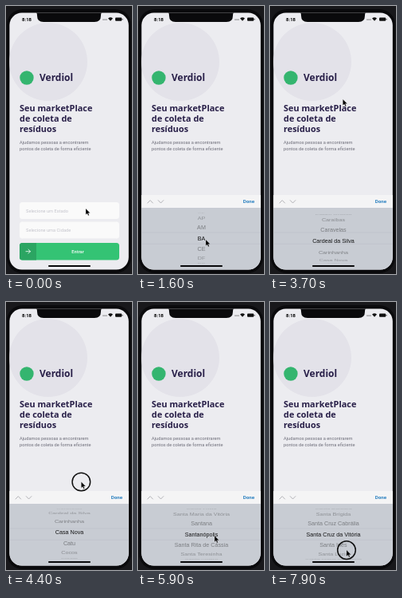
Write an HTML page that moves like this. It is 158 by 336 pixels and loops after 8000 ms.

```html
<!DOCTYPE html>
<html lang="pt-BR">
<head>
<meta charset="utf-8">
<title>Verdiol</title>
<style>
html, body { margin: 0; width: 100%; height: 100%; overflow: hidden; background: #18181b; }
svg { display: block; width: 100%; height: 100%; }
text { font-family: Roboto, "Liberation Sans", sans-serif; font-size: 5.7px; }
.title { font: 700 10.9px "Noto Sans", "Open Sans", sans-serif; fill: #281f48; }
.brand { font: 600 12px "Noto Sans", "Open Sans", sans-serif; fill: #281f48; }
.hint { fill: #c4c4cc; }
.row { font: 7.2px "Liberation Sans", Arial, sans-serif; text-anchor: middle; }
.line { fill: none; stroke-linecap: round; stroke-linejoin: round; }
</style>
</head>
<body>
<svg viewBox="0 0 158 336">
  <defs>
    <clipPath id="screen"><rect x="4.4" y="8.6" width="149.4" height="322" rx="15.5"/></clipPath>
    <clipPath id="wheel"><rect x="4" y="253" width="150" height="78"/></clipPath>
  </defs>
  <rect width="158" height="336" fill="#18181b"/>
  <rect x="1" y="4" width="156" height="331" rx="20" fill="#0a0a0c"/>
  <g clip-path="url(#screen)">
    <rect x="4" y="8" width="150" height="323" fill="#ececf0"/>
    <circle cx="53" cy="70" r="49" fill="#e3e2e9"/>
    <path d="M37 8H121Q119 8 119 12Q119 20 111 20H47Q39 20 39 12Q39 8 37 8" fill="#0a0a0c"/>
    <text x="20" y="18.6" style="font-weight:700;font-size:6px">8:18</text>
    <g fill="#111">
      <circle cx="122" cy="17" r=".6"/><circle cx="124" cy="17" r=".6"/><circle cx="126" cy="17" r=".6"/>
      <path d="M128 15.6Q131 13 134 15.6L131 18.8Z"/>
      <rect x="137" y="14.6" width="8.2" height="4.2" rx="1.1"/><rect x="145.6" y="15.9" width=".8" height="1.6"/>
    </g>

    <circle cx="26" cy="90" r="8.7" fill="#34b56f"/>
    <text class="brand" x="42" y="94.2">Verdiol</text>
    <text class="title" x="17" y="131.5">Seu marketPlace</text>
    <text class="title" x="17" y="144.8">de coleta de</text>
    <text class="title" x="17" y="158">resíduos</text>
    <g fill="#6c6c78">
      <text x="17" y="172.8">Ajudamos pessoas a encontrarem</text>
      <text x="17" y="181.2">pontos de coleta de forma eficiente</text>
    </g>

    <rect x="17" y="246" width="125" height="21" rx="3.5" fill="#fafafa"/>
    <rect x="17" y="270.5" width="125" height="21" rx="3.5" fill="#fafafa"/>
    <text id="state" class="hint" x="25" y="258.6">Selecione um Estado</text>
    <text class="hint" x="25" y="283">Selecione uma Cidade</text>
    <rect x="17" y="297" width="125" height="21.5" rx="3.5" fill="#34c374"/>
    <path d="M38 297H20.5Q17 297 17 300.5V315Q17 318.5 20.5 318.5H38Z" fill="#2ba562"/>
    <path class="line" d="M25 307.7H30.5M28 305.2L30.5 307.7L28 310.2" stroke="#fff" stroke-width=".8"/>
    <text x="90" y="309.8" text-anchor="middle" fill="#fff" font-weight="500">Entrar</text>

    <g id="picker">
      <rect x="4" y="237" width="150" height="16" fill="#f4f4f5"/>
      <rect x="4" y="253" width="150" height="78" fill="#c8ccd3"/>
      <path class="line" d="M12 247L15.3 243.6L18.6 247M25.3 243.6L28.6 247L31.9 243.6" stroke="#a2a3a8" stroke-width=".8"/>
      <text x="146" y="247.3" text-anchor="end" fill="#2a80c0" style="font-size:6.2px;font-weight:600">Done</text>
      <g id="rows" clip-path="url(#wheel)"></g>
      <path d="M4 284H154M4 298.3H154" stroke="#b2b7bf" stroke-width=".4"/>
    </g>
    <rect x="53" y="325" width="53" height="1.9" rx=".95" fill="#08080a"/>
  </g>
  <g id="cursor">
    <circle id="ring" r="11.3" fill="none" stroke="#111" stroke-width="1.5"/>
    <path d="M0 0V9.5L2.3 7.5L3.8 11L5.3 10.3L3.8 7H6.8Z" transform="scale(.8)" stroke="#ddd" stroke-width=".3"/>
  </g>
</svg>
<script>
const LOOP = 8000;
const $ = id => document.getElementById(id);
const states = "Selecione um Estado,AC,AL,AP,AM,BA,CE,DF,ES,GO".split(",");
const cities = ("Selecione uma Cidade,Abaíra,Abaré,Acajutiba,Adustina,Água Fria,Aiquara,Alagoinhas,Alcobaça," +
  "Amargosa,Anagé,Andaraí,Aporá,Aracatu,Baianópolis,Barra,Barreiras,Belmonte,Boquira,Brumado,Buerarema," +
  "Cachoeira,Caetité,Cairu,Camaçari,Canavieiras,Capim Grosso,Caraíbas,Caravelas,Cardeal da Silva,Carinhanha," +
  "Casa Nova,Catu,Cocos,Conde,Coribe,Correntina,Curaçá,Entre Rios,Esplanada,Feira de Santana,Gandu,Guanambi," +
  "Ibotirama,Ilhéus,Ipirá,Irecê,Itabuna,Jacobina,Jequié,Juazeiro,Lençóis,Macaúbas,Maragogipe,Mucugê," +
  "Nazaré,Nova Viçosa,Paramirim,Paulo Afonso,Poções,Porto Seguro,Prado,Presidente Tancredo Neves,Queimadas," +
  "Quijingue,Quixabeira,Rafael Jambeiro,Remanso,Riachão do Jacuípe,Rio Real,Ruy Barbosa,Salvador," +
  "Santa Bárbara,Santa Brígida,Santa Cruz Cabrália,Santa Cruz da Vitória,Santa Inês,Santa Luzia," +
  "Santa Maria da Vitória,Santana,Santanópolis,Santa Rita de Cássia,Santa Teresinha,Santo Amaro").split(",");
const at = name => cities.indexOf(name);

const mix = (a, b, p) => a + (b - a) * p;
function ease(start, end, t) {
  const p = Math.min(1, Math.max(0, (t - start) / (end - start)));
  return p * p * (3 - 2 * p);
}
// Each move is [start, end, target].
const follow = (from, moves, t) => moves.reduce((v, [start, end, to]) => mix(v, to, ease(start, end, t)), from);

const sheetY = t => follow(94, [[300, 700, 0], [2050, 2250, 94], [2400, 2680, 0]], t);
const stateAt = t => follow(0, [[900, 1500, 5]], t);
const cityAt = t => follow(0, [
  [2650, 2820, at("Acajutiba")],
  [3400, 3720, at("Cardeal da Silva")],
  [4300, 4960, at("Quijingue")],
  [5200, 5840, at("Santanópolis")],
  [6300, 7250, at("Santa Cruz da Vitória")]
], t);

const taps = [230, 900, 1950, 2300];
const tapX = t => follow(100, [[0, 220, 92], [450, 1100, 85], [1650, 1900, 138], [2060, 2280, 88], [2450, 2750, 95]], t);
const tapY = t => follow(254, [[0, 220, 256], [450, 1100, 293], [1650, 1900, 244], [2060, 2280, 281], [2450, 2750, 285]], t);

// After the taps the pointer swipes up and returns; two swipes drag downwards instead.
const SWIPES = 3245, PERIOD = 900;

function pointer(t) {
  if (t < SWIPES) return { x: tapX(t), y: tapY(t), down: taps.some(tap => t >= tap && t < tap + 100) };
  const swipe = Math.floor((t - SWIPES) / PERIOD), u = (t - SWIPES) / PERIOD - swipe;
  const lift = ease(.2, .42, u) - ease(.42, .95, u);
  const backwards = swipe === 3 || swipe === 4;
  return {
    x: mix(96, 91, lift),
    y: mix(Math.max(285, 240 + .009 * t), 104, lift),
    down: backwards ? u > .42 && u < .9 : u > .12 && u < .42
  };
}

const rows = Array.from({ length: 7 }, () => {
  const row = document.createElementNS("http://www.w3.org/2000/svg", "text");
  row.setAttribute("class", "row");
  row.setAttribute("y", 2.5);
  return $("rows").appendChild(row);
});

// Rows sit on a cylinder seen from the front.
function drawWheel(list, pos) {
  const base = Math.round(pos);
  rows.forEach((row, i) => {
    const index = base + i - 3, d = index - pos, angle = d * .451;
    const depth = Math.max(0, Math.cos(angle));
    row.textContent = list[index] || "";
    row.setAttribute("transform", `translate(79.5 ${291.2 + 32 * Math.sin(angle)}) scale(1 ${depth})`);
    row.setAttribute("opacity", Math.abs(d) < .5 ? .9 : .08 + .34 * depth);
  });
}

function draw(t) {
  $("picker").setAttribute("transform", `translate(0 ${sheetY(t)})`);
  if (t < 2300) drawWheel(states, stateAt(t));
  else drawWheel(cities, cityAt(t));

  const chosen = t > 1200;
  $("state").textContent = chosen ? "BA" : "Selecione um Estado";
  $("state").style.fill = chosen ? "#222" : "";

  const { x, y, down } = pointer(t);
  $("cursor").setAttribute("transform", `translate(${x} ${y})`);
  $("ring").setAttribute("opacity", down ? 1 : 0);
}

const start = performance.now();
function tick() {
  draw((performance.now() - start) % LOOP);
  requestAnimationFrame(tick);
}
tick();
</script>
</body>
</html>
```
